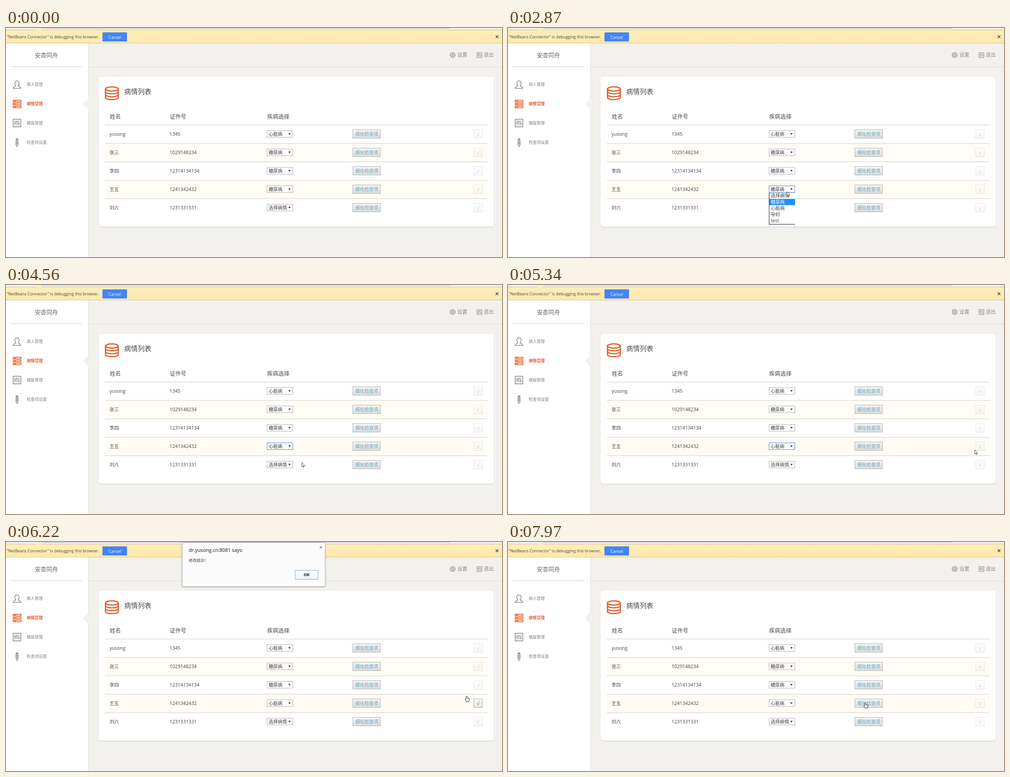
Animation of 1099 by 510 pixels, one loop 8 s. Source, as an HTML page with a canvas:

```html
<!DOCTYPE html>
<html lang="zh">
<head>
<meta charset="utf-8">
<style>
html, body { margin: 0; width: 100%; height: 100%; overflow: hidden; background: #f2f1ed; }
canvas { display: block; width: 1099px; height: 510px; }
</style>
</head>
<body>
<canvas id="stage" width="1099" height="510"></canvas>
<script>
const LOOP = 8000;
const ctx = document.getElementById('stage').getContext('2d');
const SANS = '"Open Sans", "Noto Sans CJK SC", "Noto Sans CJK", sans-serif';
const HAN = '"Noto Sans CJK TC", "Noto Sans CJK SC", "Noto Sans CJK", sans-serif';
const GREY = '#8a8a88', ORANGE = '#e8602c';

const PATIENTS = [
  ['yusong', '1345', '心脏病'],
  ['张三', '1029148234', '糖尿病'],
  ['李四', '12314134134', '糖尿病'],
  ['王五', '1241342432', '糖尿病'],
  ['刘六', '1231331331', '选择病情']
];
const OPTIONS = ['选择病情', '糖尿病', '心脏病', '孕妇', 'test'];

// Pointer moves: start, end, number of steps, then points as [progress, x, y].
const MOVES = [
  [450, 910, 7, [[0, 1066, 515], [1 / 7, 1038, 499], [0.6, 925, 430], [1, 863, 399]]],
  [1230, 2010, 11, [[0, 863, 399], [6 / 11, 680, 360], [1, 618, 364]]],
  [3250, 3630, 6, [[0, 618, 364], [1, 612, 398]]],
  [4560, 5340, 11, [[0, 612, 398], [0.5, 850, 382], [1, 1034, 367]]],
  [5430, 5560, 3, [[0, 1034, 367], [1, 1045, 355]]],
  [6030, 6830, 11, [[0, 1045, 355], [3 / 11, 1020.5, 342.5], [0.65, 850, 215], [1, 680, 100]]],
  [6910, 7140, 4, [[0, 680, 100], [0.75, 665, 72], [1, 669, 79]]],
  [7480, 7970, 7, [[0, 669, 79], [0.5, 728, 225], [1, 791.5, 357]]]
];

function text(s, x, cy, size, color, weight = 400, align = 'left', family = SANS) {
  ctx.font = `${weight} ${size}px ${family}`;
  ctx.textAlign = align;
  ctx.fillStyle = color;
  ctx.fillText(s, x, cy + size * 0.37);
}

// Chinese labels use the lightest cut available.
function label(s, x, cy, size, color, align = 'left') {
  text(s, x, cy, size, color, 300, align, HAN);
}

function rect(x, y, w, h, color) {
  ctx.fillStyle = color;
  ctx.fillRect(x, y, w, h);
}

function frame(x, y, w, h, color, width = 1) {
  ctx.strokeStyle = color;
  ctx.lineWidth = width;
  ctx.strokeRect(x, y, w, h);
}

function round(x, y, w, h, r, color) {
  ctx.beginPath();
  ctx.roundRect(x, y, w, h, r);
  ctx.fillStyle = color;
  ctx.fill();
}

function poly(points, fill, stroke, width = 1) {
  ctx.beginPath();
  points.forEach(([x, y]) => ctx.lineTo(x, y));
  ctx.closePath();
  if (fill) { ctx.fillStyle = fill; ctx.fill(); }
  if (stroke) { ctx.strokeStyle = stroke; ctx.lineWidth = width; ctx.stroke(); }
}

function line(x1, y1, x2, y2, color, width = 1) {
  ctx.beginPath();
  ctx.moveTo(x1, y1);
  ctx.lineTo(x2, y2);
  ctx.strokeStyle = color;
  ctx.lineWidth = width;
  ctx.stroke();
}

function shade(y, h, top, bottom) {
  const g = ctx.createLinearGradient(0, y, 0, y + h);
  g.addColorStop(0, top);
  g.addColorStop(1, bottom);
  return g;
}

function cross(x, y, r, color, width) {
  line(x - r, y - r, x + r, y + r, color, width);
  line(x + r, y - r, x - r, y + r, color, width);
}

function at(x, y, scale, draw) {
  ctx.save();
  ctx.translate(x, y);
  ctx.scale(scale, scale);
  draw();
  ctx.restore();
}

function slidersIcon(color) {
  frame(0.8, 0.8, 16.9, 16.9, color, 1.6);
  [[5, 9], [9.2, 6], [13.4, 11]].forEach(([x, y]) => {
    line(x, 3.5, x, 15, color, 1.3);
    ctx.beginPath();
    ctx.arc(x, y, 1.5, 0, 7);
    ctx.fillStyle = '#fff';
    ctx.fill();
    ctx.lineWidth = 1.2;
    ctx.stroke();
  });
}

function gearIcon() {
  const teeth = [];
  for (let i = 0; i < 32; i++) {
    const a = (i - 0.5) * Math.PI / 16;
    const r = i % 4 < 2 ? 5.8 : 4.5;
    teeth.push([r * Math.cos(a), r * Math.sin(a)]);
  }
  poly(teeth, null, GREY, 1.2);
  ctx.beginPath();
  ctx.arc(0, 0, 2, 0, 7);
  ctx.stroke();
}

function personIcon() {
  ctx.beginPath();
  ctx.moveTo(6.8, 11.5);
  ctx.bezierCurveTo(2.5, 6, 4.5, 0.8, 9.3, 0.8);
  ctx.bezierCurveTo(14.2, 0.8, 16, 6, 11.8, 11.5);
  ctx.bezierCurveTo(11.5, 13.5, 17.8, 13, 17.8, 17.6);
  ctx.lineTo(0.8, 17.6);
  ctx.bezierCurveTo(0.8, 13, 7, 13.5, 6.8, 11.5);
  ctx.strokeStyle = GREY;
  ctx.lineWidth = 1.5;
  ctx.stroke();
}

function listIcon() {
  for (let y = 0.8; y < 16; y += 6.6) {
    frame(0.8, y, 3.6, 3.6, ORANGE, 1.7);
    frame(6.4, y, 11.9, 3.6, ORANGE, 1.7);
    line(4.4, y + 1.8, 6.4, y + 1.8, ORANGE, 1.3);
  }
}

function pencilIcon() {
  round(0.4, 0, 6, 3.6, [2.5, 2.5, 0, 0], GREY);
  rect(0.4, 4.3, 6, 8.6, GREY);
  line(2.4, 5, 2.4, 13, '#fff', 0.7);
  line(4.4, 5, 4.4, 13, '#fff', 0.7);
  poly([[0.7, 13], [6.1, 13], [3.4, 18.5]], '#fff', GREY, 1.1);
  poly([[2.4, 16], [4.4, 16], [3.4, 18.7]], GREY);
}

function databaseIcon() {
  ctx.strokeStyle = ORANGE;
  ctx.lineWidth = 2.8;
  ctx.beginPath();
  ctx.ellipse(234.6, 135.8, 14.2, 4.6, 0, 0, 7);
  ctx.stroke();
  [141.9, 148.4, 154.9].forEach(y => {
    ctx.beginPath();
    ctx.ellipse(234.6, y, 14.2, 4.8, 0, 0, Math.PI);
    ctx.stroke();
  });
  line(220.4, 135.5, 220.4, 155, ORANGE, 2.8);
  line(248.8, 135.5, 248.8, 155, ORANGE, 2.8);
}

function infoBar() {
  rect(0, 0, 1099, 5, '#f1f1f1');
  rect(78, 0, 906, 1, '#b5b5b5');
  rect(0, 4, 1099, 1, '#c4bda8');
  rect(0, 5, 1099, 28, shade(5, 28, '#ffedb8', '#ffe9ae'));
  rect(0, 33, 1099, 1, '#d2c291');
  poly([[64, 5.5], [70, 0], [73, 0], [79, 5.5]], '#ffedb8');
  text('"NetBeans Connector" is debugging this browser.', 1.5, 20, 8.95, '#444');
  round(213.7, 9.8, 54.4, 20.3, 1.5, '#4285f4');
  text('Cancel', 241, 20.3, 9, '#fff', 400, 'center');
  cross(1088, 19.5, 3, '#3d4654', 1.5);
}

function sidebar() {
  rect(0, 34, 182, 476, '#fff');
  rect(182, 34, 1, 476, '#dddcd8');
  poly([[183, 156.5], [170, 169], [183, 181.5]], '#f2f1ed');
  label('安杏同舟', 89.5, 60, 12.8, '#5d6668', 'center');
  rect(10, 85.5, 158, 1, '#c9c9c7');
  ['病人管理', '病情管理', '模版管理', '检查项设置'].forEach((s, i) => {
    const y = 126 + i * 43;
    if (i === 1) text(s, 46, y, 8.9, ORANGE, 700);
    else text(s, 46, y, 8.9, '#808080');
  });
  at(15, 117, 1, personIcon);
  at(15, 160, 1, listIcon);
  at(15, 202.5, 1, () => slidersIcon(GREY));
  at(21, 246, 1, pencilIcon);
}

function header() {
  rect(183, 86.5, 916, 1, '#dfded9');
  at(989.7, 60.2, 1, gearIcon);
  label('设置', 1000, 60, 11.1, GREY);
  at(1043, 54.3, 0.65, () => slidersIcon(GREY));
  label('退出', 1058.5, 60, 11.1, GREY);
}

function selectBox(y, value, border) {
  rect(578, y - 8.5, 58, 16, '#fff');
  frame(578.5, y - 8, 57, 15, border);
  label(value, 582, y, 10.2, '#3c3c3c');
  poly([[625.8, y - 2.3], [630.6, y - 2.3], [628.2, y + 1.6]], '#222');
}

function pushButton(x, y, w, fill, border) {
  rect(x, y - 10.5, w, 20, fill);
  frame(x + 0.5, y - 10, w - 1, 19, border);
}

function checkButton(y, alpha, pressed) {
  ctx.globalAlpha = alpha;
  pushButton(1036, y, 20, pressed ? '#dadada' : shade(y - 10, 20, '#fafafa', '#e4e4e4'), '#b4b4b4');
  text('√', 1046.3, y, 11.5, '#777', 400, 'center', '"DejaVu Sans", sans-serif');
  ctx.globalAlpha = 1;
}

function card(t) {
  ctx.save();
  ctx.shadowColor = 'rgba(0,0,0,0.16)';
  ctx.shadowBlur = 2;
  ctx.shadowOffsetY = 1;
  round(205, 108.6, 876, 333.8, 5, '#fff');
  ctx.restore();
  databaseIcon();
  label('病情列表', 262, 141, 15, '#4a4a4a');
  label('姓名', 230, 197, 12.2, '#4a4a4a');
  label('证件号', 363, 197, 12.2, '#4a4a4a');
  label('疾病选择', 578.5, 197, 12.4, '#4a4a4a');

  const chosen = t >= 4410;
  const focused = t >= 2870 && t < 5730;
  const hovered = t >= 1930 && t < 2870;
  const ready = t >= 5560 && t < 7560;
  PATIENTS.forEach(([name, id, illness], i) => {
    const y = 236.5 + i * 41;
    const edited = i === 3;
    if (i % 2) rect(219, y - 20, 848, 41, '#fffcf5');
    rect(219, y - 21, 848, 1.3, '#d9d7d2');
    if (i) label(name, 229.5, y, 10.2, '#444');
    else text(name, 229.5, y, 10.5, '#444');
    text(id, 362.5, y, 10.5, '#444');
    const border = edited && focused ? '#4a86dd' : edited && hovered ? '#7d7d7d' : '#b0b0b0';
    selectBox(y, edited && chosen ? '心脏病' : illness, border);
    pushButton(768, y, 62, shade(y - 10, 20, '#f4f4f4', '#dbdbdb'), '#b2b2b2');
    label('细化检查项', 799.5, y, 10.2, '#69a5bb', 'center');
    checkButton(y, edited && ready ? 1 : 0.3, edited && t >= 5730 && t < 5800);
  });
}

function dropdown(pointerY) {
  const active = pointerY >= 366 ? Math.min(4, Math.floor((pointerY - 366) / 14)) : 1;
  rect(578, 366, 58, 72, '#fff');
  OPTIONS.forEach((s, i) => {
    const on = i === active;
    if (on) rect(579, 366.5 + i * 14, 57, 14, '#1e90ff');
    text(s, 582.5, 373.6 + i * 14, 10.2, on ? '#fff' : '#3c3c3c', i < 4 ? 300 : 400);
  });
  rect(578, 366, 58, 1, '#3b5f95');
  rect(578, 366, 1.2, 72, '#333a48');
  rect(578, 436.6, 58, 1.2, '#333a48');
}

function dialog(t) {
  const left = Math.max(0, 1 - (t - 6030) / 350);
  ctx.save();
  ctx.translate(0, -16 * left ** 3);
  ctx.save();
  ctx.shadowColor = 'rgba(0,0,0,0.4)';
  ctx.shadowBlur = 3;
  ctx.shadowOffsetY = 1;
  round(390, 2.5, 317.5, 98, 1.5, '#fbfbfb');
  ctx.restore();
  ctx.beginPath();
  ctx.roundRect(390.5, 3, 316.5, 97.5, 1.5);
  ctx.strokeStyle = '#bdbdbd';
  ctx.lineWidth = 1;
  ctx.stroke();
  text('dr.yusong.cn:8081 says:', 405, 19.7, 10.85, '#111');
  text('修改成功！', 405, 42.3, 8.5, '#333', 400, 'left', HAN);
  cross(697.8, 13.2, 2.4, '#777', 1.1);
  const pressed = t >= 7290;
  round(640, 64, 52, 21, 1.5, pressed ? '#dfe6ee' : shade(64, 21, '#fff', '#f1f3f6'));
  frame(640.5, 64.5, 51, 20, pressed ? '#5f8dc4' : '#93b9e6', 1.3);
  text('OK', 666, 74.5, 8.9, '#111', 700, 'center');
  ctx.restore();
}

function pointerAt(t) {
  const move = MOVES.filter(m => t >= m[0]).pop();
  if (!move) return null;
  const [start, end, steps, points] = move;
  const step = Math.floor((t - start) / (end - start) * (steps - 1) + 0.2);
  const p = Math.min(1, (step + 1) / steps);
  const i = Math.max(1, points.findIndex(q => q[0] >= p - 1e-9));
  const [a, b] = [points[i - 1], points[i]];
  const k = (p - a[0]) / (b[0] - a[0]);
  return { x: a[1] + (b[1] - a[1]) * k, y: a[2] + (b[2] - a[2]) * k };
}

function arrow() {
  poly([[0.3, 0.3], [0.3, 9.7], [2.4, 7.8], [3.8, 10.8], [5.2, 10.2], [3.9, 7.3], [6.8, 7.1]],
    '#fff', '#26262e', 0.85);
}

function hand() {
  ctx.beginPath();
  ctx.moveTo(-1.1, 8);
  ctx.lineTo(-1.1, 1.2);
  ctx.quadraticCurveTo(0, -0.4, 1.1, 1.2);
  ctx.lineTo(1.1, 4.4);
  ctx.lineTo(5, 5);
  ctx.quadraticCurveTo(6.3, 5.3, 6.2, 7);
  ctx.quadraticCurveTo(6.2, 9.5, 5, 11);
  ctx.lineTo(5, 13);
  ctx.lineTo(-0.6, 13);
  ctx.quadraticCurveTo(-1.2, 10.8, -3.5, 7.8);
  ctx.quadraticCurveTo(-3, 6, -1.1, 8);
  ctx.fillStyle = '#fff';
  ctx.fill();
  ctx.strokeStyle = '#26262e';
  ctx.lineWidth = 0.95;
  ctx.stroke();
  line(2.7, 5, 2.7, 7, '#26262e', 0.7);
  line(4.4, 5.2, 4.4, 7.2, '#26262e', 0.7);
}

function render(t) {
  const pointer = pointerAt(t);
  rect(0, 0, 1099, 510, '#f2f1ed');
  infoBar();
  sidebar();
  header();
  card(t);
  if (t >= 2870 && t < 4410) dropdown(pointer.y);
  if (t >= 6030 && t < 7480) dialog(t);
  if (pointer) {
    const linked = (t >= 5495 && t < 6290) || t >= 7960;
    at(pointer.x, pointer.y, 1, linked ? hand : arrow);
  }
}

const begin = performance.now();
function tick() {
  render((performance.now() - begin) % LOOP);
  requestAnimationFrame(tick);
}
tick();
</script>
</body>
</html>
```
